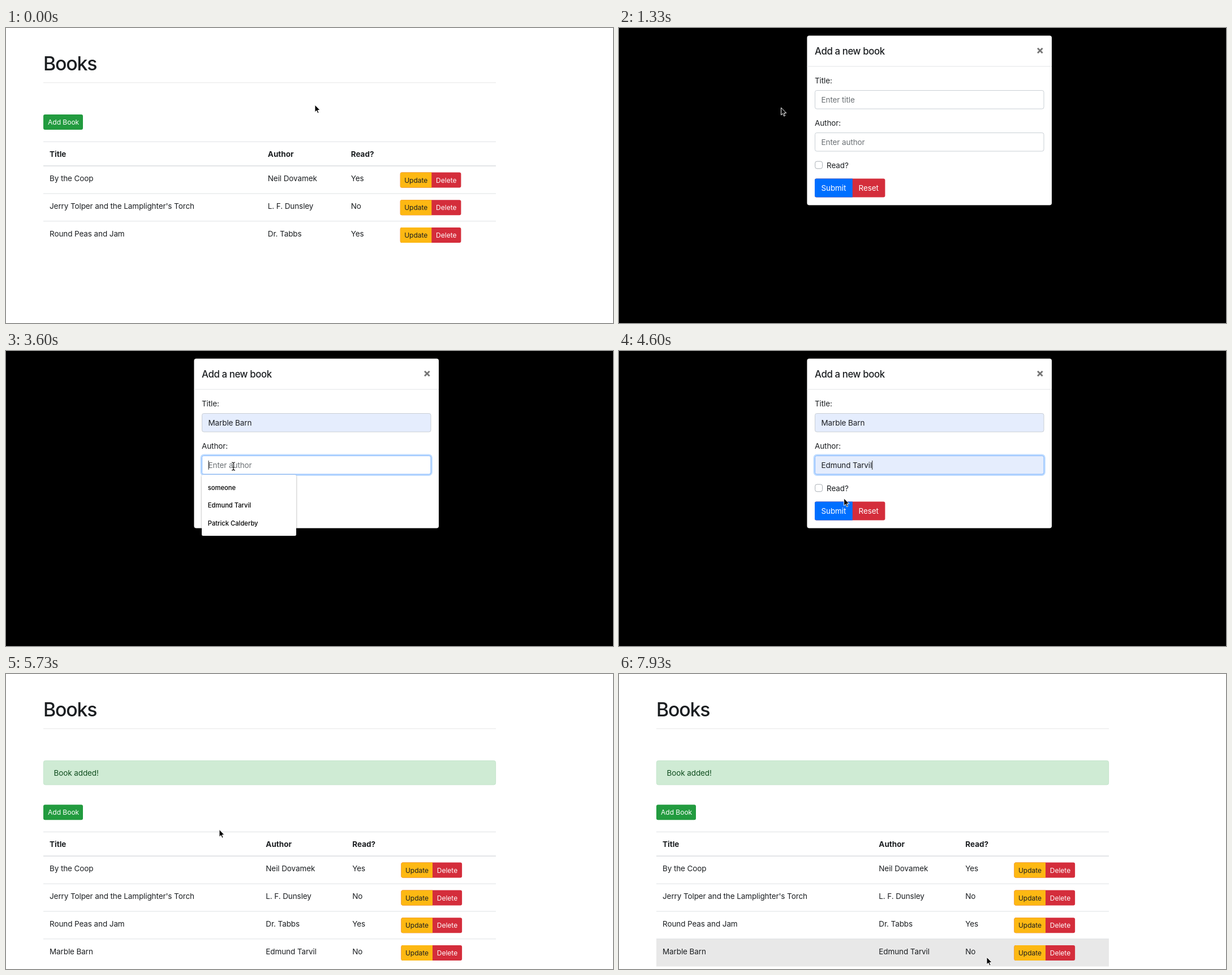
An HTML page for the animation above (8000 ms loop, 1073 by 522 pixels).

```html
<!DOCTYPE html>
<html lang="en">
<head>
<meta charset="utf-8">
<title>Books</title>
<style>
  html, body { margin: 0; width: 100%; height: 100%; overflow: hidden; background: #fff; }
  svg { display: block; width: 100%; height: 100%; }
  text {
    font: 400 13.5px Inter, Roboto, "Liberation Sans", sans-serif;
    letter-spacing: -.1px; fill: #1b1e21; white-space: pre;
  }
  .h1 { font-size: 33.8px; font-weight: 500; letter-spacing: -1.15px; }
  .h5 { font-size: 16.8px; font-weight: 500; letter-spacing: -.38px; }
  .bold { font-weight: 700; letter-spacing: 0; }
  .small { font-size: 12px; letter-spacing: 0; }
  .white { fill: #fff; }
  .success { fill: #0f4d1e; }
  .item { font-size: 11.2px; font-weight: 500; letter-spacing: 0; fill: #000; }
  .hint { fill: #6b7074; }
  .line { fill: #dee1e4; }
  .box { fill: #fff; stroke: #c9cfd5; }
  .ring { fill: none; stroke: #bfdcff; stroke-width: 2.8; }
  .menu { filter: drop-shadow(0 1px 1.5px rgba(0, 0, 0, .4)); }
</style>
</head>
<body>
<svg id="stage" viewBox="0 0 1073 522"></svg>
<script>
const LOOP = 8000, TICK = 1000 / 15;
const GREEN = '#229b3f', YELLOW = '#fdb813', RED = '#d42d3b', BLUE = '#006fff';

const BOOKS = [
  ['By the Coop', 'Neil Dovamek', 'Yes'],
  ["Jerry Tolper and the Lamplighter's Torch", 'L. F. Dunsley', 'No'],
  ['Round Peas and Jam', 'Dr. Tabbs', 'Yes'],
  ['Marble Barn', 'Edmund Tarvil', 'No']
];
const OPTIONS = {
  title: ['hi', 'Marble Barn', 'Volcanic Dale'],
  author: ['someone', 'Edmund Tarvil', 'Patrick Calderby']
};
const FIELD_Y = { title: 110, author: 184.9 };
const ROW = 48.8;

// cursor stops: time, x, y, sideways bow on the way there
const STOPS = [
  [0, 546, 136], [140, 546, 136], [740, 96, 165], [940, 96, 165],
  [1620, 405, 126], [1900, 405, 126], [2130, 409, 200], [2200, 409, 202],
  [2330, 409, 203], [3230, 409, 203], [3430, 402, 204], [3660, 402, 204],
  [4140, 400, 262], [4490, 400, 262], [4930, 385, 254], [5090, 385, 254],
  [5320, 377, 276], [5950, 377, 275], [6800, 873, 250, 75], [6950, 873, 250],
  [7800, 608, 503], [7933, 650, 501], [LOOP, 650, 501]
];

const CURSORS = {
  arrow: `<path d="M0 0V13L3 10.3L5 15L7.1 14.1L5.1 9.5H9.2Z" fill="#000" stroke="#fff"/>`,
  beam: ['#fff" stroke-width="2.6', '#000" stroke-width="1.1'].map(s =>
    `<path d="M-3 -7Q0 -7 0 -5Q0 -7 3 -7M0 -5V5M-3 7Q0 7 0 5Q0 7 3 7M-1.5 2H1.5" fill="none" stroke="${s}"/>`).join(''),
  hand: `<path d="M-1.3 8V.9a1.3 1.3 0 0 1 2.6 0V5.5C1.5 4.4 4 4.4 4.2 5.8C4.5 4.9 6.7 5 6.8 6.5C7.4 5.8 9 6.2 9 7.6V10C9 11.5 7.8 12.5 7.8 14.5H.8C.5 12.5 -2.5 10.8 -4 8.2C-4.4 7 -3 6.3 -2.2 7.1Z" fill="#fff" stroke="#000"/>`
};

// drawing helpers
const txt = (x, y, s, cls = '') => `<text x="${x}" y="${y}" class="${cls}">${s}</text>`;
const rect = (x, y, w, h, attrs) => `<rect x="${x}" y="${y}" width="${w}" height="${h}" ${attrs}/>`;
const line = (y, h = 1) => rect(66, y, 800, h, 'class="line"');

function pair(x, y, w1, w, h, left, right) {
  return rect(x, y, w, h, `rx="3" fill="${right}"`) +
    `<path d="M${x + w1} ${y}v${h}H${x + 3}q-3 0-3-3V${y + 3}q0-3 3-3Z" fill="${left}"/>`;
}

function row(book, i, top, cols) {
  const y = top + i * ROW, x = cols[2];
  return rect(66, y, 800, ROW, 'class="hover" fill="#000" opacity="0"') +
    (i ? line(y - .5) : '') +
    txt(77, y + 26.8, book[0]) + txt(cols[0], y + 26.8, book[1]) + txt(cols[1], y + 26.8, book[2]) +
    pair(x, y + 11.2, 55.5, 107.6, 27, YELLOW, RED) +
    txt(x + 7.4, y + 29.3, 'Update', 'small') + txt(x + 63.3, y + 29.3, 'Delete', 'small white');
}

function page(id, dy, books, cols, extra) {
  return `<g id="${id}">` + extra +
    (dy ? '' : rect(64.7, 151.6, 72.6, 29.8, 'id="glow" rx="4.5" fill="#a3d9b0"')) +
    rect(66, 153 + dy, 70, 27, `class="add" rx="3" fill="${GREEN}"`) +
    txt(74, 171.2 + dy, 'Add Book', 'small white') +
    line(200.7 + dy) +
    txt(77, 227.8 + dy, 'Title', 'bold') + txt(cols[0], 227.8 + dy, 'Author', 'bold') +
    txt(cols[1], 227.8 + dy, 'Read?', 'bold') +
    books.map((b, i) => row(b, i, 244.2 + dy, cols)).join('') +
    line(243.1 + dy, 1.7) + '</g>';
}

function field(id) {
  const y = FIELD_Y[id];
  return `<g id="${id}">` +
    rect(344.9, y - 1, 407.5, 35.6, 'class="ring" rx="5"') +
    rect(346.5, y + .5, 404.5, 32.6, 'class="box" rx="3.2"') +
    txt(357.5, y + 21.7, '') +
    rect(357.6, y + 9, 1, 16, 'class="caret" fill="#222"') + '</g>';
}

function menu(id) {
  const y = FIELD_Y[id] + 34;
  return `<g id="${id}Menu"><g class="menu">` + rect(346, y, 167, 108, 'rx="2.5" fill="#fff"') + '</g>' +
    OPTIONS[id].map((s, i) =>
      rect(346, y + 7 + i * 31.4, 167, 31.4, 'class="pick" fill="#bfbfbf"') +
      txt(356.8, y + 27 + i * 31.4, s, 'item')).join('') + '</g>';
}

const alertBox = rect(66.4, 153.4, 799.2, 42.6, 'rx="3.2" fill="#cfebd4" stroke="#c0e2c8" stroke-width=".9"') +
  txt(84.5, 179.8, 'Book added!', 'success');

const dialog = `<g id="dialog">` +
  rect(332.4, 13.5, 432.6, 300, 'rx="4" fill="#fff"') +
  txt(346, 46.6, 'Add a new book', 'h5') +
  '<path d="M740 35.7l8.6 8.6m0-8.6l-8.6 8.6" stroke="#757575" stroke-width="2.8"/>' +
  rect(332.4, 67.5, 432.6, .9, 'class="line"') +
  txt(346, 98, 'Title:') + txt(346, 173, 'Author:') +
  field('title') + field('author') +
  rect(346.7, 236, 12.8, 12.8, 'rx="3.2" fill="#fff" stroke="#a9afb5"') +
  txt(367, 247.7, 'Read?') +
  pair(346, 266.5, 66.8, 124.4, 33, BLUE, RED) +
  txt(357.5, 288.4, 'Submit', 'white') + txt(423.5, 288.4, 'Reset', 'white') +
  menu('title') + menu('author') + '</g>';

const stage = document.getElementById('stage');
stage.innerHTML = rect(0, 0, 1073, 522, 'fill="#fff"') +
  txt(66, 75, 'Books', 'h1') + rect(66, 96.3, 800, 1, 'fill="#e6e6e6"') +
  page('before', 0, BOOKS.slice(0, 3), [462.8, 609.7, 696.8], '') +
  page('after', 78.2, BOOKS, [459.3, 612.3, 698.5], alertBox) +
  rect(0, 0, 1073, 522, 'id="shade"') + dialog + '<g id="cursor"></g>';

const $ = s => stage.querySelector(s);
const set = (el, name, v) => el.setAttribute(name, v);
const show = (el, on) => set(el, 'visibility', on ? 'inherit' : 'hidden');
const clamp = v => Math.max(0, Math.min(1, v));
const ramp = (t, a, ms) => clamp((t - a) / ms);
const easeOut = p => 1 - Math.pow(1 - p, 1.65);
const within = (t, a, b) => t >= a && t < b;

function pointer(t) {
  const i = Math.max(1, STOPS.findIndex(s => s[0] > t));
  const [t0, x0, y0] = STOPS[i - 1], [t1, x1, y1, bow = 0] = STOPS[i];
  const p = clamp((t - t0) / (t1 - t0)), e = p * p * (3 - 2 * p);
  return [x0 + (x1 - x0) * e, y0 + (y1 - y0) * e + bow * 4 * e * (1 - e)];
}

function pointerKind(t) {
  if (within(t, 690, 850) || within(t, 5250, 5590)) return 'hand';
  if (within(t, 1480, 1980) || within(t, 2470, 3760)) return 'beam';
  return 'arrow';
}

// state: text, its class, tinted, ring strength, caret shown
function drawField(id, { value, pick, ring, caret }) {
  const g = $('#' + id), label = g.querySelector('text');
  const preview = pick >= 0;
  const s = preview ? OPTIONS[id][pick] : value || 'Enter ' + id;
  if (label.textContent !== s) label.textContent = s;
  set(label, 'class', preview ? 'item' : value ? '' : 'hint');
  set(g.querySelector('.ring'), 'opacity', ring);
  const box = g.querySelector('.box');
  box.style.fill = preview || value ? '#e5edfd' : '#fff';
  box.style.stroke = ring > .5 ? '#80b6ff' : '';
  const mark = g.querySelector('.caret');
  show(mark, caret);
  set(mark, 'x', 357.6 + (value && !preview ? label.getComputedTextLength() : 0));
}

function drawMenu(id, open, pick) {
  const g = $(`#${id}Menu`);
  show(g, open);
  g.querySelectorAll('.pick').forEach((el, i) => show(el, i === pick));
}

function draw(t) {
  const added = t >= 5700;
  show($('#before'), !added);
  show($('#after'), added);
  show($('#glow'), within(t, 790, 5700));
  set($('#before .add'), 'fill', within(t, 690, 5700) ? '#1c8335' : GREEN);

  set($('#shade'), 'opacity', ramp(t, 866, 134) - ramp(t, 5580, 150));
  const lift = 1 - easeOut(ramp(t, 797, 300)) + easeOut(ramp(t, 5540, 300));
  const box = $('#dialog');
  set(box, 'opacity', ramp(t, 797, 150) - ramp(t, 5540, 150));
  set(box, 'transform', `translate(0 ${-43.3 * lift})`);
  show(box, within(t, 797, 5690));

  const titlePick = within(t, 1980, 2040) ? 0 : within(t, 2040, 2460) ? 1 : -1;
  const authorPick = within(t, 3860, 4100) ? 0 : within(t, 4100, 4260) ? 1 : -1;
  const sent = t >= 5390;
  drawField('title', {
    value: t >= 2460 && !sent ? BOOKS[3][0] : '',
    pick: titlePick,
    ring: ramp(t, 1640, 150) - ramp(t, 3220, 150),
    caret: within(t, 1660, 2990)
  });
  drawField('author', {
    value: t >= 4260 && !sent ? BOOKS[3][1] : '',
    pick: authorPick,
    ring: ramp(t, 3220, 150) - ramp(t, 5300, 150),
    caret: within(t, 3260, 4120) || within(t, 4260, 4790)
  });
  drawMenu('title', within(t, 1790, 2460), titlePick);
  drawMenu('author', within(t, 3460, 4260), authorPick);

  const [x, y] = pointer(t);
  const over = added && within(x, 66, 866) ? Math.floor((y - 322.4) / ROW) : -1;
  stage.querySelectorAll('#after .hover').forEach((el, i) => set(el, 'opacity', i === over ? .09 : 0));

  const cursor = $('#cursor'), kind = pointerKind(t);
  if (cursor.dataset.kind !== kind) {
    cursor.dataset.kind = kind;
    cursor.innerHTML = CURSORS[kind];
  }
  set(cursor, 'transform', `translate(${x} ${y})`);
}

function frame() {
  const t = performance.now() % LOOP;
  draw(Math.floor((t + 5) / TICK) * TICK);
  requestAnimationFrame(frame);
}
frame();
</script>
</body>
</html>
```
